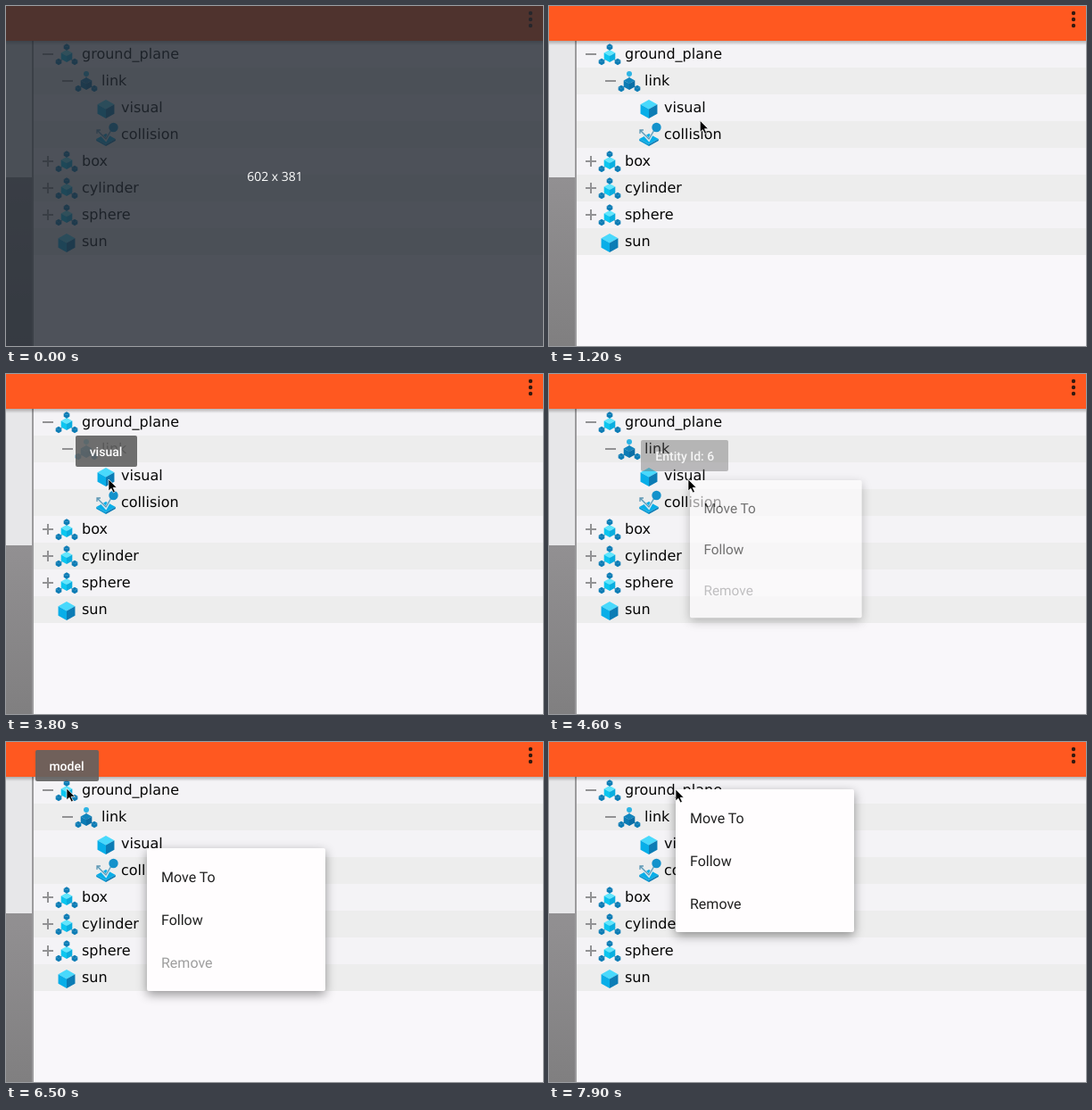
Write an HTML page that moves like this. It is 602 by 381 pixels and loops after 8 s.

```html
<!DOCTYPE html>
<html>
<head>
<meta charset="utf-8">
<style>
html, body { margin: 0; width: 100%; height: 100%; overflow: hidden; background: #f9f7fa; }
svg { display: block; text-rendering: geometricPrecision; }
.label { font: 16px "DejaVu Sans", sans-serif; fill: #060606; }
.tip { font: 500 14px Roboto, sans-serif; fill: #fff; text-anchor: middle; }
.item { font: 16px Roboto, sans-serif; fill: #212121; }
.size { font: 14px "Open Sans", sans-serif; fill: #fff; text-anchor: middle; }
.off { fill: #9e9e9e; }
.menu { filter: drop-shadow(0 4px 6px rgba(0, 0, 0, .4)); }
</style>
</head>
<body>
<svg id="stage" width="602" height="381" viewBox="0 0 602 381"></svg>
<script>
const LOOP = 8000, STEP = 100;
const DARK = '#0c7cb5', MID = '#08aee8', LIGHT = '#49d9fc', GREY = '#929294';

const rect = (x, y, w, h, fill, more = '') =>
  `<rect x="${x}" y="${y}" width="${w}" height="${h}" fill="${fill}" ${more}/>`;
const text = (x, y, cls, s) => `<text x="${x}" y="${y}" class="${cls}">${s}</text>`;
const path = (d, fill, more = '') => `<path d="${d}" fill="${fill}" ${more}/>`;
const line = (d, color, width) => path(d, 'none', `stroke="${color}" stroke-width="${width}"`);
const circle = (x, y, r, fill) => `<circle cx="${x}" cy="${y}" r="${r}" fill="${fill}"/>`;

const pen = document.createElement('canvas').getContext('2d');
function widthOf(s, font) {
  pen.font = font;
  return pen.measureText(s).width;
}

// A box seen from a corner; a low height makes a tile
function cube(x, y, r, [top, left, right] = [LIGHT, MID, DARK], depth = r) {
  const w = r * .9, h = r / 2, side = `v${depth}l`;
  return path(`M${x} ${y - r}l${w} ${h}l${-w} ${h}l${-w} ${-h}z`, top) +
    path(`M${x} ${y}${side}${-w} ${-h}v${-depth}z`, left) +
    path(`M${x} ${y}${side}${w} ${-h}v${-depth}z`, right);
}
const node = (x, y) => cube(x, y, 3.7, [DARK, DARK, DARK]);

function tripod(x, y, core, head) {
  return line(`M${x} ${y - 7}v9l-9 7m9 -7l9 7`, '#7fa6b8', 1) +
    node(x - 9, y + 8.5) + node(x + 9, y + 8.5) + core + head;
}

const icons = {
  model: (x, y) =>
    tripod(x, y, cube(x, y + 2, 7, ['#62e6fd', '#0cc6f0', '#0aaee0']), node(x, y - 8)),
  link: (x, y) =>
    tripod(x, y, cube(x, y + 3, 7, ['#1285bd', DARK, '#0a6fa6']), circle(x, y - 8, 3, '#2cb4e4')),
  visual: (x, y) => cube(x, y + 1.5, 10.5),
  collision: (x, y) =>
    cube(x, y + 11, 12, [MID, '#0898d2', DARK], 2) +
    line(`M${x - 9} ${y - 4}l9 10l6 -11`, '#d6eaf2', 3) +
    line(`M${x - 10} ${y - 1}v-4h4m-4 0l10 10l6 -10`, '#5f98b4', 1.3) +
    circle(x + 8.5, y - 8, 5.2, '#1492cb')
};

// name, indent level, kind, expander
const rows = [
  ['ground_plane', 0, 'model', '-'], ['link', 1, 'link', '-'],
  ['visual', 2, 'visual'], ['collision', 2, 'collision'],
  ['box', 0, 'model', '+'], ['cylinder', 0, 'model', '+'],
  ['sphere', 0, 'model', '+'], ['sun', 0, 'visual']
];
const rowX = i => 68 + 22 * rows[i][1], rowY = i => 54 + 30 * i;

function row([name, , kind, expander], i) {
  const x = rowX(i), y = rowY(i);
  let s = rect(31, y - 15, 571, 30, i % 2 ? '#ededed' : '#f4f3f6');
  if (expander) s += rect(x - 27, y - 1, 12, 2, GREY);
  if (expander === '+') s += rect(x - 22, y - 6, 2, 12, GREY);
  return s + icons[kind](x, y) + text(x + 17, y + 5, 'label', name);
}

const scene =
  `<defs>
    <linearGradient id="floor" x2="0" y2="1"><stop stop-color="#929092"/><stop offset="1" stop-color="#807f80"/></linearGradient>
    <linearGradient id="shade" x2="0" y2="1"><stop stop-opacity=".26"/><stop offset="1" stop-opacity="0"/></linearGradient>
  </defs>` +
  rect(0, 0, 602, 381, '#f9f7fa') +
  rect(0, 39, 29, 153, '#e7e7e9') + rect(0, 192, 29, 189, 'url(#floor)') +
  rows.map(row).join('') +
  rect(29, 39, 2, 342, '#9c9b9d') +
  rect(0, 39, 602, 5, 'url(#shade)') + rect(0, 0, 602, 39, '#ff5820') +
  [8, 15, 22].map(y => circle(588, y, 2.2, '#33190f')).join('');

// Tooltips sit centered above the hovered icon or label
function tooltip(i, onLabel, opacity) {
  const [name, , kind] = rows[i];
  const s = onLabel ? `Entity Id: ${4 + i}` : kind;
  const w = Math.round(widthOf(s, '500 14px Roboto')) + 32;
  const x = rowX(i) + (onLabel ? 17 + widthOf(name, '16px "DejaVu Sans"') / 2 : 0);
  const y = rowY(i) - (onLabel ? 40 : 45);
  return `<g opacity="${opacity}">` +
    rect(Math.round(x - w / 2), y, w, 35, '#616161', 'rx="2" opacity=".9"') +
    text(x, y + 23, 'tip', s) + '</g>';
}

function menu(x, y, scale, opacity, canRemove) {
  return `<g class="menu" opacity="${opacity}" transform="translate(${x} ${y}) scale(${scale})">` +
    rect(0, 0, 200, 160, '#fffdfe', 'rx="2"') +
    ['Move To', 'Follow', 'Remove'].map((s, i) =>
      text(16, 38 + 48 * i, i < 2 || canRemove ? 'item' : 'item off', s)).join('') + '</g>';
}

const clamp = v => Math.min(1, Math.max(0, v));
const easeOut = (v, power) => 1 - (1 - clamp(v)) ** power;

// start, end, x, y of each pointer move
const moves = [
  [300, 500, 213, 300], [600, 900, 147, 190], [900, 1000, 176, 134],
  [1100, 1400, 156, 117], [2300, 2400, 149, 124], [2400, 3100, 115, 118],
  [3700, 4300, 156, 118], [5400, 5600, 92, 84], [5700, 6100, 68, 52],
  [7000, 7100, 87, 64], [7200, 7500, 142, 53]
];
moves[6][0] = 3800;

function pointer(t) {
  if (t < 300) return '';
  let x = 131, y = 228;
  for (const [start, end, toX, toY] of moves) {
    const k = clamp((t - start) / (end - start));
    x += (toX - x) * k;
    y += (toY - y) * k;
  }
  return path('M0 0V13L3 10.3L5.3 15L7.4 14L5.1 9.3H9.2Z', '#000',
    `stroke="#fff" stroke-width=".7" transform="translate(${x} ${y})"`);
}

// row, on label, shown at, fade start, fade length
const tips = [
  [2, true, 1900, 2400, 500], [2, false, 3300, 3800, 500],
  [2, true, 4500, 4500, 300], [0, false, 6500, 7100, 0]
];
// x, y, opens, closes, remove enabled
const menus = [[158, 119, 4560, 7540, false], [142, 53, 7650, LOOP, true]];

function frame(t) {
  let s = scene;
  for (const [i, onLabel, on, fade, length] of tips)
    if (t >= on && t < fade + length)
      s += tooltip(i, onLabel, 1 - easeOut((t - fade) / length, 2));
  for (const [x, y, open, close, canRemove] of menus) {
    if (t < open || t >= close + 150) continue;
    const grow = easeOut((t - open) / 220, 5) - easeOut((t - close) / 220, 5);
    const opacity = easeOut((t - open) / 150, 3) - easeOut((t - close) / 150, 3);
    s += menu(x, y, .9 + .1 * grow, opacity, canRemove);
  }
  s += pointer(t);
  if (t < 100)
    s += rect(0, 0, 602, 381, '#242a32', 'opacity=".8"') + text(301.5, 196, 'size', '602 x 381');
  return s;
}

const stage = document.getElementById('stage');
let last = -1;
function draw() {
  const t = Math.floor(performance.now() % LOOP / STEP) * STEP;
  if (t !== last) stage.innerHTML = frame(last = t);
  requestAnimationFrame(draw);
}
draw();
</script>
</body>
</html>
```
